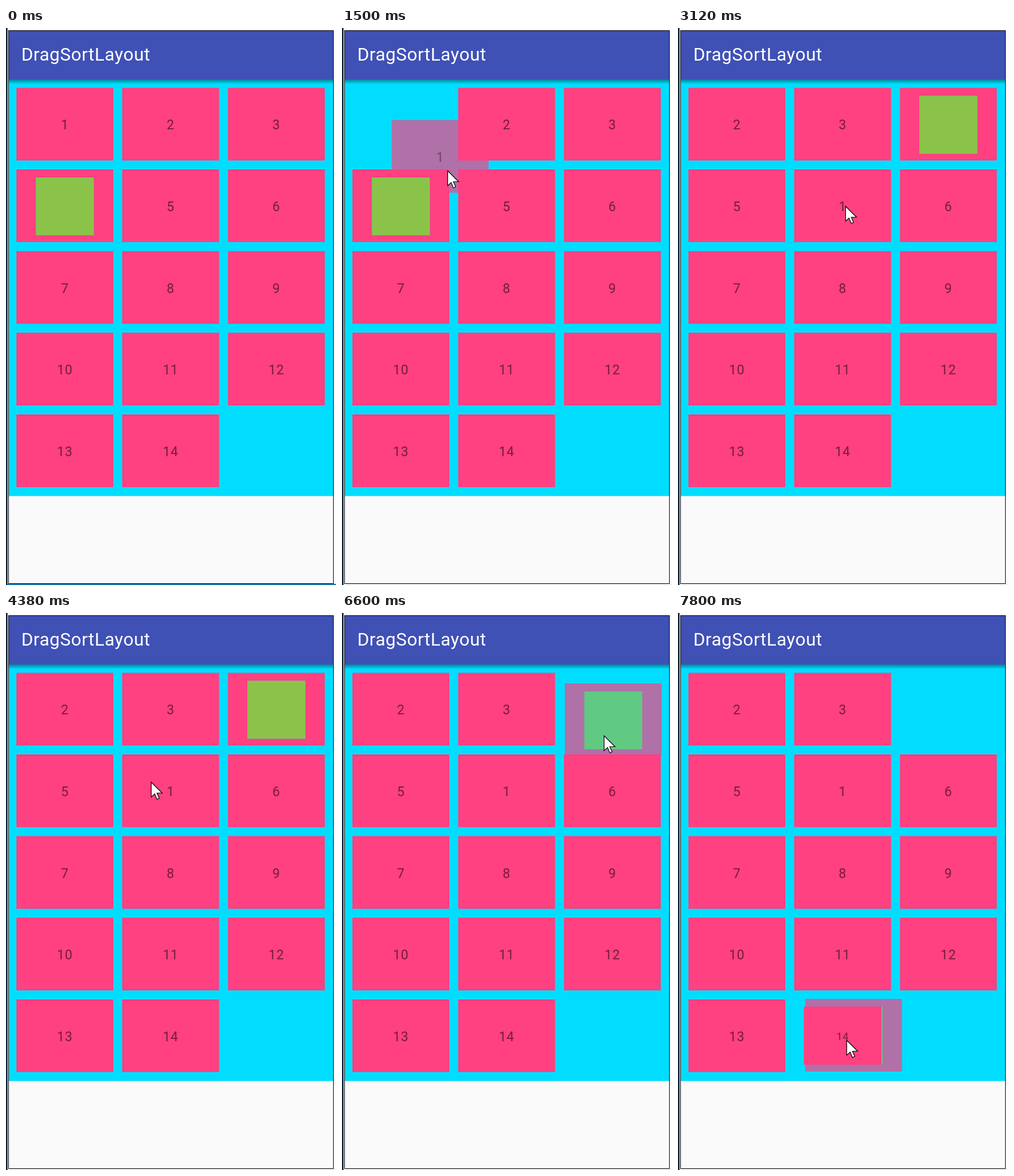
Animation, 576 px wide and 973 px high, one loop 8 s. Source, as an HTML page with a canvas:

```html
<!DOCTYPE html>
<html lang="en">
<head>
<meta charset="utf-8">
<title>DragSortLayout</title>
<style>
html, body { margin: 0; width: 576px; height: 973px; overflow: hidden; }
canvas { display: block; }
</style>
</head>
<body>
<canvas id="stage" width="576" height="973"></canvas>
<script>
const ctx = document.getElementById('stage').getContext('2d');
const LOOP = 8000, STEP = 60;
const CARD_W = 169, CARD_H = 127, ICON = 4, ICON_SIZE = 101;
const ENTER = 240, PRESS_1 = 1020, DROP_1 = 2700, PRESS_ICON = 6480;

const startOrder = Array.from({ length: 14 }, (_, i) => i + 1);
const droppedOrder = [2, 3, ICON, 5, 1, ...startOrder.slice(5)];

// Each move is [begin, end, x, y]; the point rests between moves.
const pointer = {
  home: [540, 950],
  moves: [
    [240, 720, 115, 193], [1200, 1980, 295, 338], [2040, 2820, 289, 317],
    [3060, 3240, 298, 299], [3360, 3480, 314, 288], [3900, 4020, 302, 285],
    [4140, 5040, 118, 322], [5460, 6060, 455, 195], [6420, 6600, 457, 214],
    [6600, 7140, 390, 567], [7140, 7620, 296, 755], [7620, 7800, 294, 746]
  ]
};
// Distance from a dragged card's corner to the pointer.
const firstGrip = { home: [97.3, 88], moves: [] };
const secondGrip = { home: [68, 91], moves: [[6600, 7140, 58, 101], [7140, 7800, 72, 72]] };

const progress = (t, from, to) => Math.min(1, Math.max(0, (t - from) / (to - from)));

function locate({ home, moves }, t) {
  return moves.reduce(([x, y], [from, to, toX, toY]) => {
    const k = progress(t, from, to);
    return [x + (toX - x) * k, y + (toY - y) * k];
  }, home);
}

function rect(color, x, y, w, h) {
  ctx.fillStyle = color;
  ctx.fillRect(x, y, w, h);
}

function label(text, x, y, size, spacing, color, align) {
  ctx.font = `${size}px Roboto, sans-serif`;
  ctx.letterSpacing = spacing + 'px';
  ctx.textAlign = align;
  ctx.fillStyle = color;
  ctx.fillText(text, x, y);
}

function drawWindow(focused) {
  rect('#fff', 0, 0, 576, 973);
  rect('#0b2438', 0, 0, 2, 973);
  rect('#2f6f96', 2, 0, 1, 973);
  rect(focused ? '#1c78b4' : '#eee', 3, 971, 573, 2);
  rect('#000', 4, 4, 568, 967);
  rect('#fafafa', 5, 5, 566, 965);
  rect('#00ddff', 5, 90, 566, 727.6);
  const shadow = ctx.createLinearGradient(0, 90, 0, 98);
  shadow.addColorStop(0, 'rgba(0,0,0,.4)');
  shadow.addColorStop(1, 'rgba(0,0,0,0)');
  rect(shadow, 5, 90, 566, 8);
  rect('#3f51b5', 5, 5, 566, 85);
  label('DragSortLayout', 26.7, 57, 31.5, 0.5, '#fff', 'left');
}

function drawCard(id, [x, y], scale, alpha) {
  ctx.save();
  ctx.globalAlpha = alpha;
  ctx.translate(x + CARD_W / 2, y + CARD_H / 2);
  ctx.scale(scale, scale);
  // An icon leaves a hole in the background so the card fades as a whole.
  ctx.beginPath();
  ctx.rect(-CARD_W / 2, -CARD_H / 2, CARD_W, CARD_H);
  if (id === ICON) ctx.rect(-ICON_SIZE / 2, -49.5, ICON_SIZE, ICON_SIZE);
  ctx.fillStyle = '#ff4081';
  ctx.fill('evenodd');
  if (id === ICON) rect('#8bc34a', -ICON_SIZE / 2, -49.5, ICON_SIZE, ICON_SIZE);
  else label(id, 0, 9.3, 23, 0.7, 'rgba(0,0,0,.54)', 'center');
  ctx.restore();
}

function drawPointer([x, y]) {
  ctx.save();
  ctx.translate(Math.round(x) + 0.5, Math.round(y) + 0.5);
  ctx.fillStyle = '#fff';
  ctx.strokeStyle = '#000';
  ctx.lineWidth = 1.2;
  const arrow = new Path2D('M0 0V26L6 20.5L10 30L14 28L10 19H19Z');
  ctx.fill(arrow);
  ctx.stroke(arrow);
  ctx.restore();
}

function gripOf(id, t) {
  if (id === 1 && t >= PRESS_1 && t < DROP_1) return firstGrip;
  if (id === ICON && t >= PRESS_ICON) return secondGrip;
}

// A card shrinks while another is held over it.
function scaleOf(id, t) {
  if (id === 5 && t < DROP_1) return 1 - 0.2 * progress(t, 1900, 2100);
  if (id === 14) return 1 - 0.2 * progress(t, 7560, 7800);
  return 1;
}

function draw(t) {
  const tip = locate(pointer, t);
  drawWindow(t < ENTER);
  (t < DROP_1 ? startOrder : droppedOrder).forEach((id, i) => {
    const cell = [18.2 + 184.6 * (i % 3), 104.5 + 142.6 * Math.floor(i / 3)];
    const grip = gripOf(id, t);
    const place = grip ? locate(grip, t).map((g, axis) => tip[axis] - g) : cell;
    drawCard(id, place, scaleOf(id, t), grip ? 0.69 : 1);
  });
  if (t >= ENTER) drawPointer(tip);
}

const start = performance.now();
function tick() {
  const t = (performance.now() - start) % LOOP;
  draw(Math.floor(t / STEP) * STEP);
  requestAnimationFrame(tick);
}
tick();
</script>
</body>
</html>
```
